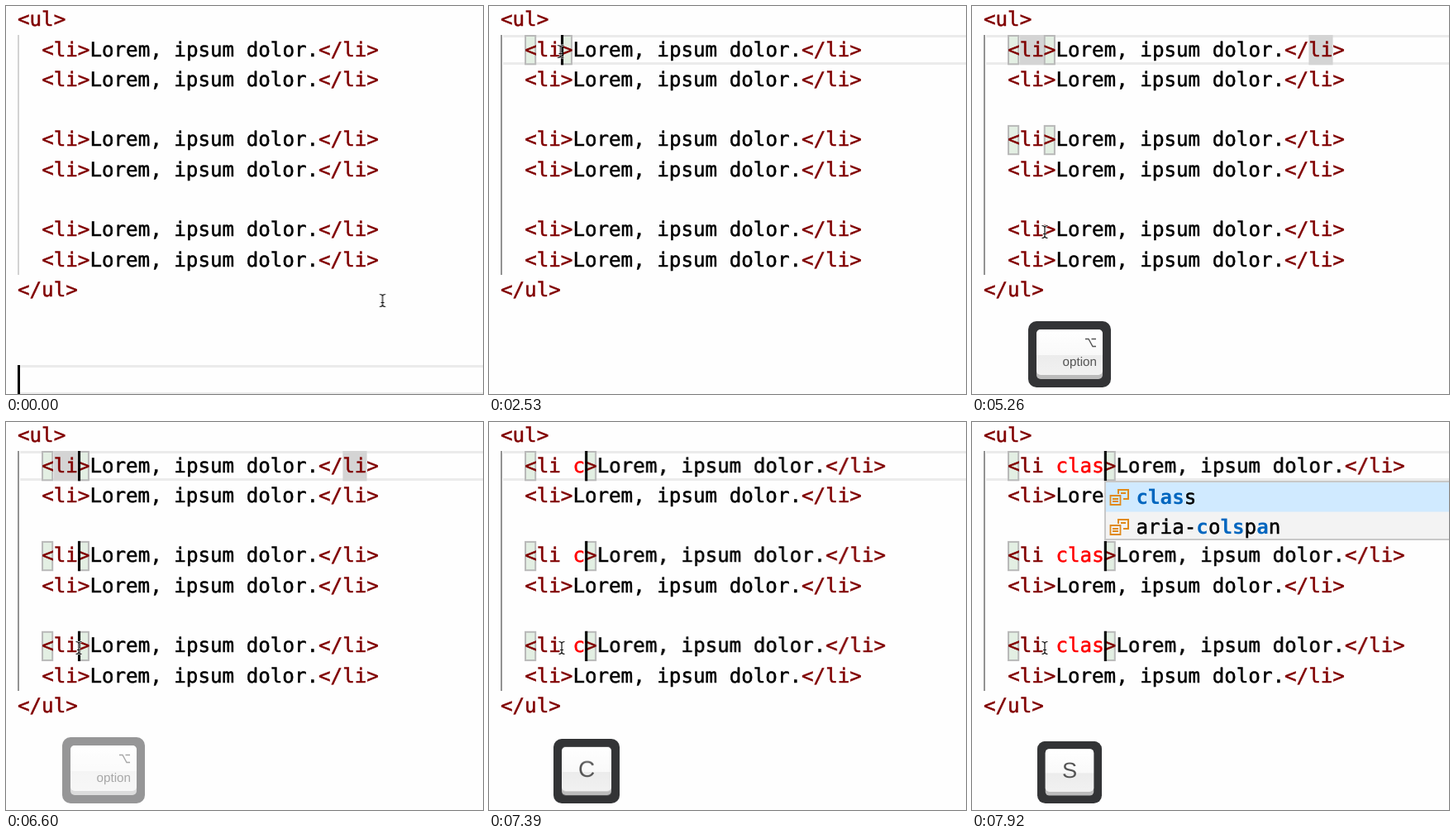
An HTML page that plays this animation: 577 px wide and 469 px high, repeating every 8000 ms.

```html
<!DOCTYPE html>
<html lang="en">
<head>
<meta charset="utf-8">
<title>Multiple cursors</title>
<style>
  html, body { margin: 0; width: 100%; height: 100%; overflow: hidden; background: #fefefe; }
  svg { display: block; width: 100%; height: 100%; }
  text { white-space: pre; text-rendering: geometricPrecision; }
  .code { font: 24.2px "DejaVu Sans Mono", monospace; stroke-width: .5; }
  .match { font-weight: bold; fill: #0066bf; }
  .cap { font: 28px "Liberation Sans", Arial, sans-serif; fill: #555; text-anchor: middle; }
  .label { font: 15.2px "Liberation Sans", Arial, sans-serif; fill: #555; text-anchor: end; }
  .key { transform-origin: 118px 461px; }
</style>
</head>
<body>
<svg viewBox="0 0 577 469">
  <defs>
    <linearGradient id="face" x1="0" y1="0" x2="0" y2="1">
      <stop offset="0" stop-color="#fff"/>
      <stop offset=".56" stop-color="#f9f9f9"/>
      <stop offset=".57" stop-color="#ececec"/>
      <stop offset="1" stop-color="#f1f1f1"/>
    </linearGradient>
  </defs>
</svg>
<script>
const LOOP = 8000, FRAME = 87;
const COL = 14.57, ROW = 36.3, LEFT = 14, TOP = -1.3;
const TAG = '#800000', ATTR = '#ff0000';
const stage = document.querySelector('svg');
const colX = c => LEFT + c * COL;
const rowY = r => TOP + r * ROW;

function add(parent, name, attrs = {}, content = '') {
  const el = document.createElementNS('http://www.w3.org/2000/svg', name);
  for (const k in attrs) el.setAttribute(k, attrs[k]);
  el.textContent = content;
  return parent.appendChild(el);
}
const group = (parent, cls = '') => add(parent, 'g', { class: cls });
const rect = (parent, x, y, width, height, fill, more) =>
  add(parent, 'rect', { x, y, width, height, fill, ...more });

// runs: [string, colour or class] pairs on one baseline
function code(parent, x, y, runs) {
  const line = add(parent, 'text', { class: 'code', x, y });
  for (const [str, look] of runs)
    add(line, 'tspan', look === 'match' ? { class: look } : { fill: look, stroke: look }, str);
}
const codeAt = (parent, col, row, runs) =>
  code(parent, colX(col), Math.round(rowY(row) + 25.56), runs);

function play(el, prop, table, easing = () => 'step-end') {
  const rows = table[0][0] ? [[0, table[0][1]], ...table] : table.slice();
  rows.push([LOOP, rows[rows.length - 1][1]]);
  el.animate(rows.map(([t, v], i) => ({
    offset: t / LOOP, [prop]: v, easing: rows[i + 1] ? easing(rows[i + 1][0] - t) : 'linear'
  })), { duration: LOOP, iterations: Infinity });
}
// visible from the first time, toggled at each following one
function toggle(el, ...times) {
  const table = times.map((t, i) => [t, i % 2 ? 0 : 1]);
  play(el, 'opacity', times[0] ? [[0, 0], ...table] : table);
}

// current line and indent guide
function lineFrame(row) {
  const g = group(stage), y = Math.round(rowY(row));
  rect(g, 17, y, 560, 3, '#ebebeb');
  rect(g, 17, y + 33, 560, 3, '#ebebeb');
  return g;
}
toggle(lineFrame(12), 0, 2450);
toggle(lineFrame(1), 2450);
const guide = rect(stage, 14, 35, 2, 290, '#d3d3d3');
play(guide, 'fill', [[0, '#d3d3d3'], [2520, '#939393']]);

const tailRuns = [['>', TAG], ['Lorem, ipsum dolor.', '#000'], ['</li>', TAG]];
const bracket = (parent, col, row) =>
  rect(parent, colX(col) + .9, rowY(row) + 1, COL - 2.4, ROW - 2, '#e3efe3',
    { stroke: '#b9b9b9', 'stroke-width': 2 });

const typed = [[6780, ' '], [7310, 'c'], [7480, 'l'], [7650, 'a'], [7830, 's']];
const blinks = [4560, 5080, 5430, 5880, 6420];

function editedLine(row, clickAt, caretTimes) {
  const line = group(stage), tail = group(stage);
  toggle(bracket(line, 2, row), clickAt);
  toggle(bracket(tail, 5, row), clickAt);
  if (row === 1) {
    toggle(rect(line, colX(3), rowY(row), 2 * COL, ROW, '#d4d4d4'), 2800, 6780);
    toggle(rect(tail, colX(27), rowY(row), 2 * COL, ROW, '#d4d4d4'), 2800, 6780);
  }
  codeAt(line, 2, row, [['<li', TAG]]);
  typed.forEach(([t, ch], i) => {
    const g = group(line);
    codeAt(g, 5 + i, row, [[ch, ATTR]]);
    toggle(g, t);
  });
  codeAt(tail, 5, row, tailRuns);
  toggle(rect(tail, colX(5) + .2, rowY(row), 3, ROW, '#000'), ...caretTimes);
  play(tail, 'transform', [[0, 'translateX(0px)'],
    ...typed.map(([t], i) => [t, `translateX(${(i + 1) * COL}px)`])]);
}

codeAt(stage, 0, 0, [['<ul>', TAG]]);
codeAt(stage, 0, 9, [['</ul>', TAG]]);
for (const row of [2, 5, 8]) codeAt(stage, 2, row, [['<li', TAG], ...tailRuns]);
editedLine(1, 2450, [2450, 2970, 3510, 4020, ...blinks]);
editedLine(4, 4560, blinks);
editedLine(7, 5430, blinks.slice(2));
toggle(rect(stage, 14, 434, 3, 36, '#000'), 0, 90, 540, 1080, 1580, 2080);

// suggestion list
const popup = group(stage);
rect(popup, 161, 72, 430, 70, '#f3f3f3', { stroke: '#c8c8c8', 'stroke-width': 2 });
rect(popup, 162, 73, 420, 35.5, '#d0eaff');
function suggestion(y, runs) {
  const icon = add(popup, 'g', { fill: 'none', stroke: '#e08a1a', 'stroke-width': 2 });
  add(icon, 'path', { d: `M177 ${y - 12}v-5h12v11h-6M180 ${y - 13}h6` });
  add(icon, 'path', { d: `M167.5 ${y - 10}h12v11h-12zM170 ${y - 6}h7M170 ${y - 3}h7`, 'stroke-width': 1.8 });
  code(popup, 198.5, y, runs);
}
suggestion(99, [['clas', 'match'], ['s', '#000']]);
suggestion(135, [['aria-', '#000'], ['c', 'match'], ['o', '#000'], ['ls', 'match'],
  ['p', '#000'], ['a', 'match'], ['n', '#000']]);
toggle(popup, 7910);

// pressed keys
function key(width) {
  const g = group(stage, 'key'), x = 118 - width / 2;
  rect(g, x, 381, width, 80, '#333436', { rx: 10 });
  rect(g, x + 10, 391, width - 20, 60, '#bcbcbc', { rx: 5 });
  rect(g, x + 10, 391, width - 20, 55, 'url(#face)', { rx: 5 });
  return g;
}
function pressed(g, from, to = LOOP) {
  toggle(g, from, ...(to < LOOP ? [to] : []));
  const grow = [[0, 'scale(.975,.94)'], [from + 75, 'scale(1,.975)'], [from + 160, 'scale(1,1)']];
  play(g, 'transform', grow.filter(([t]) => t < LOOP));
}
const option = key(100);
add(option, 'path', { d: 'M137 402.5h4l5 9h4M144.5 402.5h5.5', fill: 'none', stroke: '#555', 'stroke-width': 1.4 });
add(option, 'text', { class: 'label', x: 151, y: 435 }, 'option');
play(option, 'opacity', [[0, 0], [3510, .33], [3590, .67], [3670, 1], [6590, .51], [6685, 0]]);
pressed(key(236), 6780, 7310);
[['C', 7310, 7480], ['L', 7480, 7650], ['A', 7650, 7910], ['S', 7910]].forEach(([ch, from, to]) => {
  const g = key(80);
  add(g, 'text', { class: 'cap', x: 118, y: 428 }, ch);
  pressed(g, from, to);
});

// I-beam pointer
const pointer = group(stage);
const beam = 'M-3.5-7.5Q-.5-7.5 0-5.5Q.5-7.5 3.5-7.5M0-5.5V5.5M-3.5 7.5Q-.5 7.5 0 5.5Q.5 7.5 3.5 7.5M-2 2.5H2';
for (const [stroke, width] of [['#fff', 2.6], ['#111', 1.2]])
  add(pointer, 'path', { d: beam, fill: 'none', stroke, 'stroke-width': width });
const path = [
  [0, 455.5, 356], [640, 455.5, 356], [810, 438, 357], [1150, 365, 361], [1490, 284, 358],
  [1840, 180, 210], [2100, 110, 90], [2270, 86.5, 55], [3770, 86.5, 55], [4110, 100, 100],
  [4400, 89, 163], [4750, 89, 163], [5000, 89, 215], [5250, 88, 273]
];
play(pointer, 'transform', path.map(([t, x, y]) => [t, `translate(${x}px,${y}px)`]),
  span => `steps(${Math.max(1, Math.round(span / FRAME))}, end)`);
</script>
</body>
</html>
```
